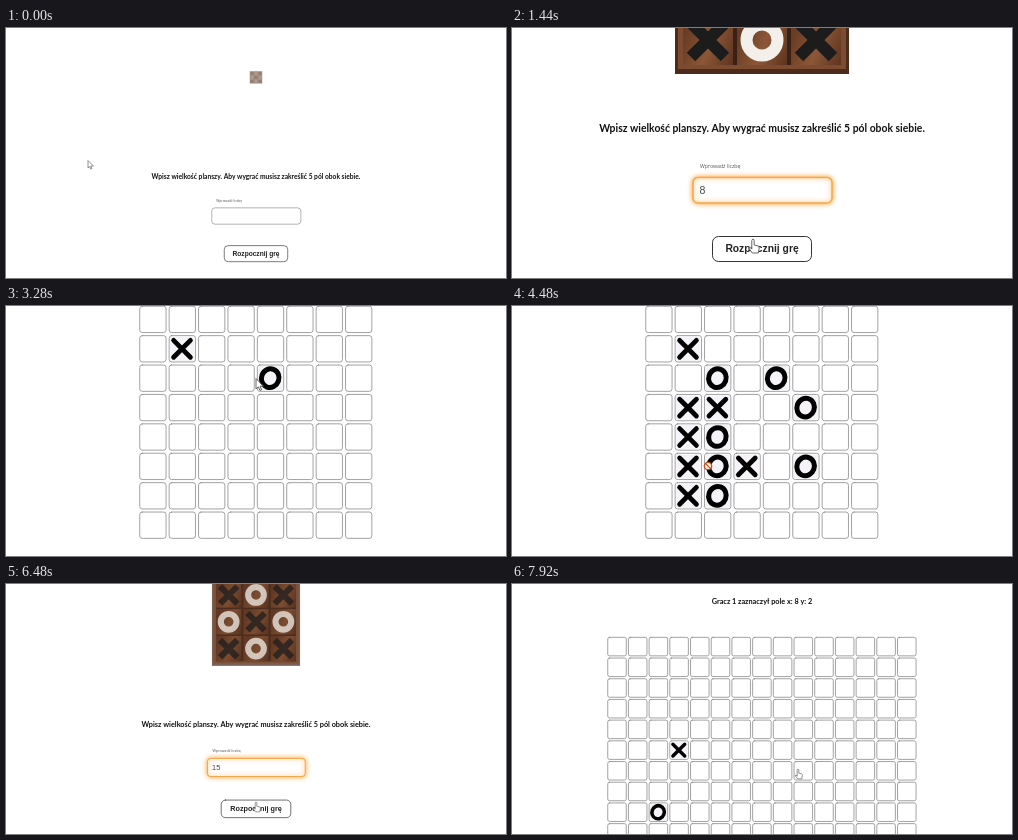
Animation of 500x250 px, one loop 8 s. Source, as an HTML page with a canvas:

```html
<!DOCTYPE html>
<html lang="pl">
<head>
<meta charset="utf-8">
<style>
html, body { margin: 0; width: 100%; height: 100%; overflow: hidden; background: #fff; }
canvas { display: block; }
</style>
</head>
<body>
<canvas id="stage" width="500" height="250"></canvas>
<script>
const ctx = document.getElementById('stage').getContext('2d');
const LOOP = 8000, STEP = 80, SMALL = 0.703;
const TITLE_FONT = '700 10.4px Lato, sans-serif';

const ARROW = new Path2D('M0 0V10L2.4 7.8 4 11.5 5.6 10.8 4 7.2H7.2Z');
const HAND = new Path2D('M4 9V1.5a1.2 1.2 0 0 1 2.4 0V6l4 1q1.2.4 1 2l-.8 5H4.5L1 9.2q1-1.5 3 .5z');

// time, mark, column, row
const FIRST_GAME = [
  [2240, 'X', 1, 1], [3200, 'O', 4, 2], [3600, 'X', 2, 3], [3760, 'O', 5, 3],
  [4080, 'X', 3, 5], [4080, 'O', 5, 5], [4160, 'X', 1, 3], [4160, 'O', 2, 2],
  [4240, 'X', 1, 4], [4240, 'O', 2, 4], [4320, 'X', 1, 6], [4400, 'O', 2, 6],
  [4400, 'X', 1, 5], [4480, 'O', 2, 5], [4720, 'X', 1, 7]
];
const SECOND_GAME = [[6800, 'X', 3, 5], [7520, 'O', 2, 8]];

// time, x, y, pointer shape
const POINTER = [
  [0, 82, 133, 'arrow'], [160, 82, 133, 'arrow'], [800, 215, 163, 'arrow'],
  [960, 230, 164, 'arrow'], [1120, 235, 174, 'arrow'], [1440, 241, 211, 'hand'],
  [1600, 241, 211, 'hand'], [1680, 183, 50, 'hand'], [1760, 183, 50, 'hand'],
  [1920, 181, 48, 'hand'], [2160, 181, 48, 'hand'], [2240, 180, 46, 'no'],
  [2400, 180, 46, 'no'], [2480, 200, 22, 'hand'], [2640, 225, 6, 'hand'],
  [2960, 257, 65, 'hand'], [3120, 257, 65, 'hand'], [3200, 257, 67, 'no'],
  [3280, 250, 73, 'arrow'], [3440, 238, 4, 'hand'], [3600, 207, 98, 'no'],
  [3680, 250, 99, 'hand'], [3760, 292, 99, 'no'], [3840, 298, 106, 'no'],
  [4000, 298, 106, 'no'], [4080, 294, 160, 'no'], [4160, 205, 74, 'no'],
  [4240, 205, 130, 'no'], [4400, 205, 190, 'no'], [4480, 196, 160, 'no'],
  [4640, 178, 214, 'hand'], [4720, 178, 220, 'no'], [4960, 178, 220, 'no'],
  [5040, 236, 218, 'no'], [6000, 236, 218, 'no'], [6240, 245, 188, 'arrow'],
  [6400, 250, 218, 'hand'], [6480, 250, 218, 'hand'], [6560, 205, 190, 'hand'],
  [6640, 166, 161, 'hand'], [6720, 166, 161, 'no'], [6960, 166, 161, 'no'],
  [7040, 164, 172, 'hand'], [7440, 146, 226, 'hand'], [7520, 146, 228, 'no'],
  [7600, 146, 228, 'no'], [7680, 214, 202, 'hand'], [7920, 286, 185, 'hand']
];

const lerp = (a, b, p) => a + (b - a) * p;
const ramp = (t, from, to) => Math.min(1, Math.max(0, (t - from) / (to - from)));
const smooth = p => p * p * (3 - 2 * p);

function zoomed(scale, y, draw) {
  ctx.save();
  ctx.translate(250, y);
  ctx.scale(scale, scale);
  ctx.translate(-250, -y);
  draw();
  ctx.restore();
}

function text(str, x, y, font, color = '#111', align = 'center') {
  ctx.font = font;
  ctx.fillStyle = color;
  ctx.textAlign = align;
  ctx.fillText(str, x, y);
}

function box(x, y, w, h, r, stroke, width = 1, fill = '#fff') {
  ctx.beginPath();
  ctx.roundRect(x, y, w, h, r);
  ctx.fillStyle = fill;
  ctx.fill();
  ctx.strokeStyle = stroke;
  ctx.lineWidth = width;
  ctx.stroke();
}

function cross(x, y, r, width, color) {
  ctx.beginPath();
  ctx.moveTo(x - r, y - r);
  ctx.lineTo(x + r, y + r);
  ctx.moveTo(x + r, y - r);
  ctx.lineTo(x - r, y + r);
  ctx.lineWidth = width;
  ctx.strokeStyle = color;
  ctx.stroke();
}

function ring(x, y, rx, ry, width, color, tilt = 0) {
  ctx.beginPath();
  ctx.ellipse(x, y, rx, ry, tilt, 0, Math.PI * 2);
  ctx.lineWidth = width;
  ctx.strokeStyle = color;
  ctx.stroke();
}

function woodenBoard(grow) {
  ctx.save();
  ctx.translate(250, lerp(-54, -41, grow));
  ctx.scale(lerp(0.116, 1, grow), lerp(0.116, 1, grow));
  ctx.globalAlpha = lerp(0.2, 1, grow);
  ctx.fillStyle = '#4b2b1b';
  ctx.fillRect(-87, -87, 174, 174);
  ctx.fillStyle = '#7d4c30';
  ctx.fillRect(-84, -84, 168, 166);
  ctx.fillStyle = '#3a2117';
  ctx.fillRect(-79, -79, 158, 157);
  for (let i = 0; i < 9; i++) {
    const x = (i % 3 - 1) * 54, y = (Math.floor(i / 3) - 1) * 53;
    const wood = ctx.createLinearGradient(x - 25, y, x + 25, y + 20);
    wood.addColorStop(0, '#693c25');
    wood.addColorStop(0.5, '#8c5737');
    wood.addColorStop(1, '#603520');
    ctx.fillStyle = wood;
    ctx.fillRect(x - 25, y - 25, 50, 50);
    ctx.lineCap = 'butt';
    if (i % 2) ring(x, y, 15.5, 15.5, 12, '#f3f0eb');
    else cross(x, y, 17, 12, '#1d1c1d');
  }
  ctx.restore();
}

function startPage(grow, value, focused) {
  woodenBoard(grow);
  text('Wpisz wielkość planszy. Aby wygrać musisz zakreślić 5 pól obok siebie.', 250, 104, TITLE_FONT);
  text('Wprowadź liczbę', 188, 140, '5.2px "Open Sans", sans-serif', '#555', 'left');
  if (focused) {
    ctx.save();
    ctx.shadowColor = '#ff9d2e';
    ctx.shadowBlur = 5;
    box(181, 149.5, 139, 25.5, 5, '#f5a74b', 1.5);
    ctx.restore();
  } else {
    box(181, 149.5, 139, 25.5, 5, '#888');
  }
  text(value, 187.5, 166, '10.5px "Liberation Sans", Arial, sans-serif', '#444', 'left');
  box(200.5, 208.5, 99, 25, 6, '#333');
  text('Rozpocznij grę', 250, 224, 'bold 10.3px "Liberation Sans", Arial, sans-serif', '#222');
}

function board(size, left, top, pitch, moves, t) {
  const cell = pitch * 0.895, scale = pitch / 29.4;
  for (let i = 0; i < size * size; i++) {
    const x = left + (i % size) * pitch, y = top + Math.floor(i / size) * pitch;
    box(x - cell / 2, y - cell / 2, cell, cell, 2.5 * scale, '#8b8b8b', 0.8);
  }
  ctx.lineCap = 'round';
  for (const [time, mark, col, row] of moves) {
    if (t < time) continue;
    const x = left + col * pitch, y = top + row * pitch;
    ctx.fillStyle = '#f5f3f7';
    ctx.fillRect(x - 12 * scale, y - 12 * scale, 24 * scale, 24 * scale);
    if (mark === 'X') cross(x - 0.3, y, 8.4 * scale, 4.8 * scale, '#000');
    else ring(x - 0.3, y, 8.7 * scale, 9.4 * scale, 5 * scale, '#000', 0.35);
  }
}

function pointer(t, scale) {
  let i = POINTER.length - 1;
  while (POINTER[i][0] > t) i--;
  const a = POINTER[i], b = POINTER[i + 1] || a;
  const p = b === a ? 0 : ramp(t, a[0], b[0]);
  ctx.save();
  ctx.translate(lerp(a[1], b[1], p), lerp(a[2], b[2], p));
  ctx.lineCap = 'round';
  ctx.lineJoin = 'round';
  if (a[3] === 'no') {
    ctx.beginPath();
    ctx.arc(0, 0, 3.7, 0, Math.PI * 2);
    ctx.moveTo(-2.6, -2.6);
    ctx.lineTo(2.6, 2.6);
    ctx.fillStyle = '#fff3e8';
    ctx.fill();
    ctx.strokeStyle = '#b9521f';
    ctx.lineWidth = 1.3;
    ctx.stroke();
  } else {
    const hand = a[3] === 'hand', shape = hand ? HAND : ARROW;
    ctx.scale(scale, scale);
    if (hand) ctx.translate(-5.2, 0);
    ctx.fillStyle = '#fff';
    ctx.fill(shape);
    ctx.strokeStyle = '#555';
    ctx.lineWidth = 0.9;
    ctx.stroke(shape);
  }
  ctx.restore();
}

function status(t) {
  if (t < 6800) return 'Gra w trakcie';
  return t < 7760 ? 'Gracz 2 zaznaczył pole x: 5 y: 3' : 'Gracz 1 zaznaczył pole x: 8 y: 2';
}

function render(t) {
  ctx.fillStyle = '#fff';
  ctx.fillRect(0, 0, 500, 250);
  let scale = 1;
  if (t < 1680) {
    scale = lerp(0.641, 1, smooth(ramp(t, 0, 800)));
    zoomed(scale, 234, () => startPage(smooth(ramp(t, 0, 800)), t < 1120 ? '' : '8', t >= 960));
  } else if (t < 5040) {
    board(8, 146.9, 13.4, 29.4, FIRST_GAME, t);
  } else if (t < 6240) {
    scale = lerp(1, SMALL, smooth(ramp(t, 6000, 6240)));
    zoomed(scale, 13, () => {
      text('Wygrywa gracz 1', 250, 23.3, TITLE_FONT);
      board(8, 146.9, 83.4, 29.4, FIRST_GAME, t);
    });
  } else if (t < 6560) {
    scale = SMALL;
    zoomed(scale, 234, () => startPage(smooth(ramp(t, 6080, 6720)), t < 6320 ? '' : '15', t >= 6320));
  } else {
    scale = SMALL;
    zoomed(scale, 13, () => text(status(t), 250, 23.3, TITLE_FONT));
    board(15, 105, 62.6, 20.7, SECOND_GAME, t);
  }
  pointer(t, Math.max(scale, 0.7));
}

const start = performance.now();
function tick() {
  const t = (performance.now() - start) % LOOP;
  render(Math.floor(t / STEP) * STEP);
  requestAnimationFrame(tick);
}
tick();
</script>
</body>
</html>
```
